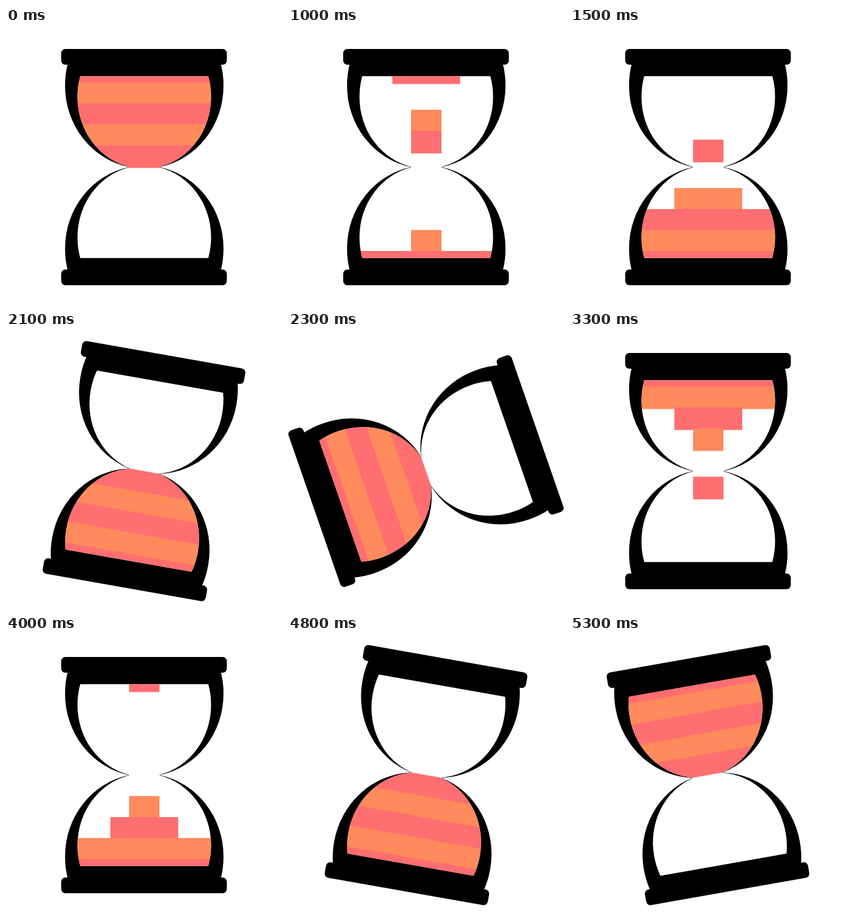
Animation of 500 by 500 pixels, one loop 5.41 s. Source, as an HTML page:

```html
<!DOCTYPE html>
<html lang="en">
<head>
<meta charset="utf-8">
<title>Hourglass</title>
<style>
  html, body { margin: 0; height: 100%; overflow: hidden; background: #fff; }
  svg { display: block; width: 100%; height: 100%; }
</style>
</head>
<body>
<svg viewBox="0 0 500 500">
  <defs>
    <path id="bulb" d="M134.500 87.300A121 130 0 0 0 129.500 125A121 130 0 0 0 222.500 251.500V252.500H278.500V251.500A121 130 0 0 0 371.500 125A121 130 0 0 0 366.500 87.300Z"/>
    <g id="half">
      <rect x="100" y="38" width="300" height="28.500" rx="7.500"/>
      <path d="M112 64A143.500 150 0 0 0 107 105A143.500 150 0 0 0 222.500 252H278.500A143.500 150 0 0 0 394 105A143.500 150 0 0 0 389 64Z"/>
    </g>
    <clipPath id="inside">
      <use href="#bulb"/>
      <use href="#bulb" transform="matrix(1 0 0 -1 0 504)"/>
    </clipPath>
  </defs>
  <g id="glass">
    <use href="#half"/>
    <use href="#half" transform="matrix(1 0 0 -1 0 504)"/>
    <g clip-path="url(#inside)">
      <rect width="500" height="500" fill="#fff"/>
      <g id="sand"></g>
    </g>
  </g>
</svg>
<script>
const LOOP = 5410, STEP = 100, STEPS_PER_TURN = 27;
const WIDE = 317, NARROW = 55, PITCH = 38, DROP = 191.5;
const glass = document.getElementById('glass');
const sand = document.getElementById('sand');

// Layers from top to bottom; the lowest one moves first.
const layers = [0, 1, 2, 3, 4].map(i => {
  const rect = document.createElementNS('http://www.w3.org/2000/svg', 'rect');
  rect.setAttribute('height', 41);
  rect.setAttribute('fill', i % 2 ? '#ff8a5c' : '#ff6e70');
  sand.append(rect);
  const delay = (4 - i) * 200;
  return {
    rect,
    top: 60.5 + PITCH * i,
    shrink: delay,
    fall: i === 1 ? 900 : delay + 500, // the second layer drops along with the third
    spread: delay + 800
  };
});

// Smooth progress from 0 to 1
function ease(t, start, length) {
  const u = Math.min(1, Math.max(0, (t - start) / length));
  return u * u * (3 - 2 * u);
}

function draw(now) {
  const step = Math.min(Math.floor(now % LOOP / STEP), 2 * STEPS_PER_TURN - 1);
  const t = step % STEPS_PER_TURN * STEP;
  for (const { rect, top, shrink, fall, spread } of layers) {
    const width = WIDE + (NARROW - WIDE) * (ease(t, shrink, 300) - ease(t, spread, 300));
    rect.setAttribute('x', 250.5 - width / 2);
    rect.setAttribute('width', width);
    rect.setAttribute('y', top + DROP * ease(t, fall, 300));
  }
  glass.setAttribute('transform', `rotate(${180 * ease(t, 2000, 700)} 250 252)`);
}

const begin = performance.now();
function tick() {
  draw(performance.now() - begin);
  requestAnimationFrame(tick);
}
tick();
</script>
</body>
</html>
```
